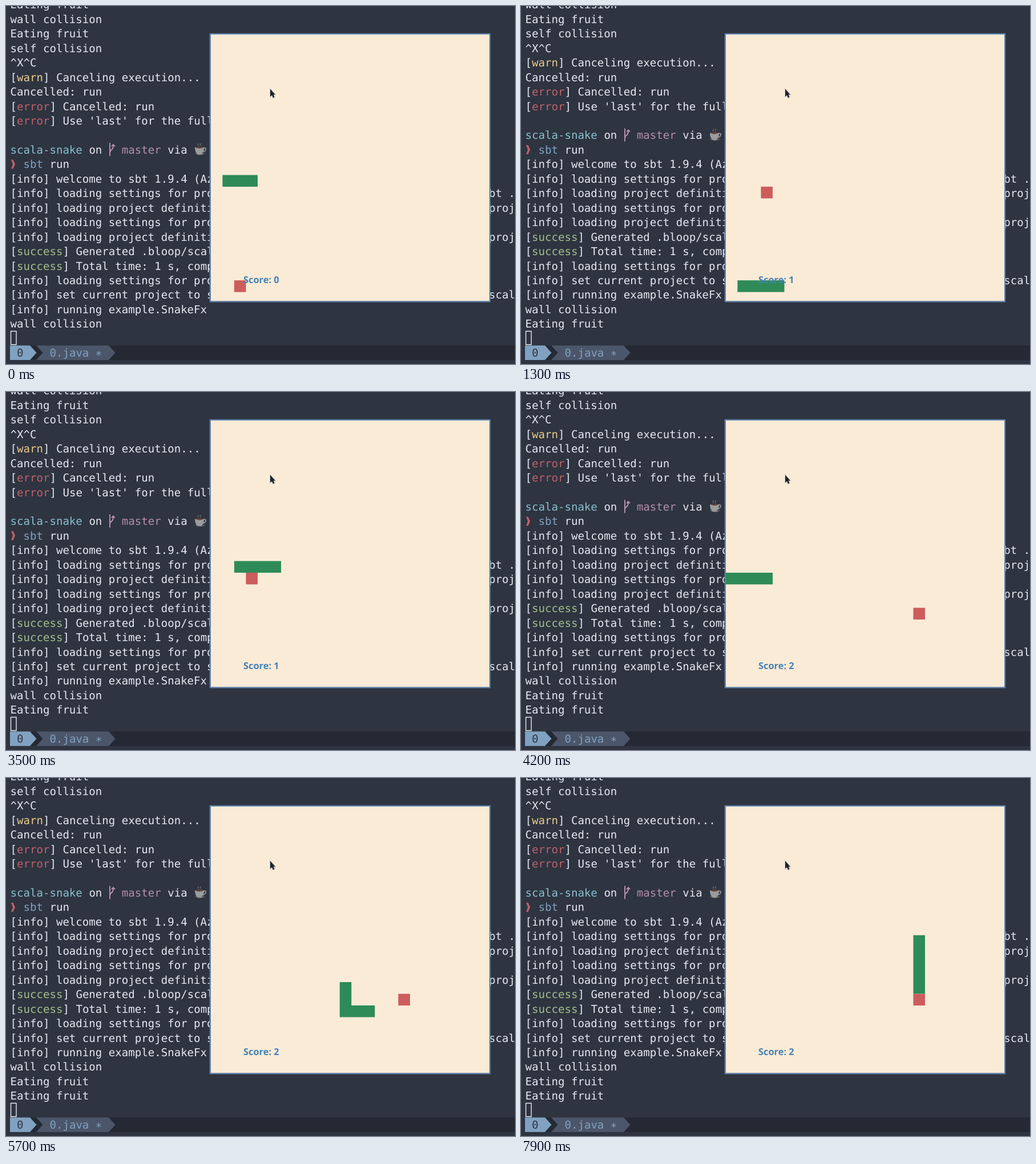
Recreate the animation shown at these times as an HTML page with a canvas. Size 892 by 628 pixels, loop 8 s.

```html
<!DOCTYPE html>
<html lang="en">
<head>
<meta charset="utf-8">
<title>Snake in a terminal</title>
<style>
  html, body { margin: 0; width: 100%; height: 100%; overflow: hidden; background: #2e3440; }
  canvas { display: block; }
</style>
</head>
<body>
<canvas id="stage" width="892" height="628"></canvas>
<script>
const ctx = document.getElementById('stage').getContext('2d');
const LOOP = 8000, TICK = 100;

// ---- Terminal ----
const LEFT = 7.5, CHAR = 11.49, ROW = 25.45, TAIL_COL = 73;
const MONO = '19.08px "DejaVu Sans Mono", monospace';
const COLORS = { w: '#e5e9f0', y: '#ebcb8b', r: '#bf616a', g: '#a3be8c', c: '#88c0d0', p: '#b48ead', b: '#81a1c1' };

// {x...} colours a run; the part after | shows to the right of the game window.
const LINES = [
  'Eating fruit',
  'wall collision',
  'Eating fruit',
  'self collision',
  '^X^C',
  '[{ywarn}] Canceling execution...',
  'Cancelled: run',
  '[{rerror}] Cancelled: run',
  "[{rerror}] Use 'last' for the full log",
  '',
  '{cscala-snake} on   {pmaster} via',
  '  {bsbt} run',
  '[info] welcome to sbt 1.9.4 (Az',
  '[info] loading settings for project|bt .',
  '[info] loading project definition|proj',
  '[info] loading settings for project',
  '[info] loading project definition|proj',
  '[{gsuccess}] Generated .bloop/scala-snake',
  '[{gsuccess}] Total time: 1 s, completed',
  '[info] loading settings for project',
  '[info] set current project to scala|scal',
  '[info] running example.SnakeFx',
  'wall collision',
  'Eating fruit',
  'Eating fruit'
];
const PROMPT_ROW = 10;

function text(str, x, y, color, font = MONO) {
  ctx.font = font;
  ctx.fillStyle = color;
  ctx.fillText(str, x, y);
}

function shape(color, ...points) {
  ctx.fillStyle = color;
  ctx.beginPath();
  points.forEach(([x, y]) => ctx.lineTo(x, y));
  ctx.fill();
}

function fill(color, path) {
  ctx.fillStyle = color;
  ctx.fill(new Path2D(path));
}

function stroke(color, width, path) {
  ctx.strokeStyle = color;
  ctx.lineWidth = width;
  ctx.stroke(new Path2D(path));
}

function drawLine(line, y) {
  const [main, tail] = line.split('|');
  let col = 0;
  for (const run of main.split(/(\{.*?\})/)) {
    const colored = run[0] === '{';
    const str = colored ? run.slice(2, -1) : run;
    text(str, LEFT + col * CHAR, y, COLORS[colored ? run[1] : 'w']);
    col += str.length;
  }
  if (tail) text(tail, LEFT + TAIL_COL * CHAR, y, COLORS.w);
}

function drawPromptIcons(centerY) {
  ctx.save();
  ctx.translate(0, centerY);
  // branch
  stroke(COLORS.p, 2, 'M182 -12V11M182 5Q182 2 185 0Q188 -2 188 -8M185 -6L188 -9L191 -6');
  // cup
  stroke('#8c8c8c', 2, 'M346 -3Q351 -4 350 0Q349 3 344 4');
  fill('#77787c', 'M330 6Q340 13 350 6Q340 8 330 6Z');
  fill('#9c9c9c', 'M331 -4H347Q347 5 342 8H336Q331 5 331 -4Z');
  fill('#5d4037', 'M332 -4Q339 -8 346 -4Q339 0 332 -4Z');
  stroke('#8c8c8c', 1, 'M337 -7Q335 -9 338 -11M341 -7Q339 -9 342 -11');
  // prompt arrow
  shape(COLORS.r, [9, ROW - 8], [12.5, ROW - 8], [16, ROW], [12.5, ROW + 8], [9, ROW + 8], [12, ROW]);
  ctx.restore();
}

function drawTerminal(scroll) {
  ctx.fillStyle = '#2e3440';
  ctx.fillRect(0, 0, 892, 628);
  for (let row = 0; row < 23; row++) drawLine(LINES[row + scroll], 4.4 + row * ROW);
  drawPromptIcons(-2.4 + (PROMPT_ROW - scroll) * ROW);
  stroke(COLORS.w, 1.4, 'M8.5 570.5H18V594H8.5Z');

  ctx.fillStyle = '#242933';
  ctx.fillRect(7, 595.5, 885, 25.5);
  shape(COLORS.b, [7, 595.5], [42, 595.5], [53.5, 608.2], [42, 621], [7, 621]);
  shape('#4c566a', [53, 595.5], [180, 595.5], [191.5, 608.2], [180, 621], [53, 621], [64.5, 608.2]);
  text('0', LEFT + CHAR, 615.2, '#2e3440');
  text('0.java', LEFT + 6 * CHAR, 615.2, COLORS.b);
  text('*', LEFT + 13 * CHAR, 618.5, COLORS.b);
}

// ---- Game ----
const CELL = 20.54;
const DIRS = { U: [0, -1], D: [0, 1], L: [-1, 0], R: [1, 0] };
const route = [[3, 12]];
for (const [, dir, count] of 'L2 D9 R7 U9 L8 D1 R11 D4 R6 U9 L1 D7'.matchAll(/(\w)(\d+)/g)) {
  for (let i = 0; i < count; i++) {
    const [x, y] = route.at(-1);
    route.push([x + DIRS[dir][0], y + DIRS[dir][1]]);
  }
}

const FRUITS = [[2, 21], [3, 13], [16, 16]];
const EATEN_AT = [11, 42];
// The snake moves one cell per tick, except on these ticks.
const MOVES = { 0: 0, 11: 0, 22: 0, 27: 0, 28: 3, 29: 0, 30: 0, 33: 0, 37: 0, 38: 2, 42: 0, 47: 0, 67: 0 };

// One path for all cells, so that no seams show between them.
function drawCells(cells, color) {
  ctx.fillStyle = color;
  ctx.beginPath();
  for (const [col, row] of cells) ctx.rect(358.85 + col * CELL, 49.9 + row * CELL, CELL, CELL);
  ctx.fill();
}

function drawGame(tick, score) {
  ctx.fillStyle = '#5e81ac';
  ctx.fillRect(356.7, 47.8, 492.5, 471.8);
  ctx.fillStyle = '#faebd7';
  ctx.fillRect(359, 50, 488, 467.3);

  let head = 2;
  for (let i = 0; i <= tick; i++) head += MOVES[i] ?? 1;
  // Growth shows one move after eating.
  const length = 3 + EATEN_AT.filter(t => tick > t).length;
  drawCells([FRUITS[score]], '#cd5c5c');
  drawCells(route.slice(head - length + 1, head + 1), '#2e8b57');
  text('Score: ' + score, 416, 485.6, '#4682b4', 'bold 16.4px "Noto Sans", sans-serif');
}

function drawPointer() {
  const outline = 'M463 145.5V159L466 156.5L468 161L470.5 160L468.8 155.5H472Z';
  stroke('#d9d3cb', 2, outline);
  fill('#20242e', outline);
}

function frame() {
  const tick = Math.floor(performance.now() % LOOP / TICK);
  const score = EATEN_AT.filter(t => tick >= t).length;
  ctx.textRendering = 'geometricPrecision';
  drawTerminal(score);
  drawGame(tick, score);
  drawPointer();
  requestAnimationFrame(frame);
}
frame();
</script>
</body>
</html>
```
